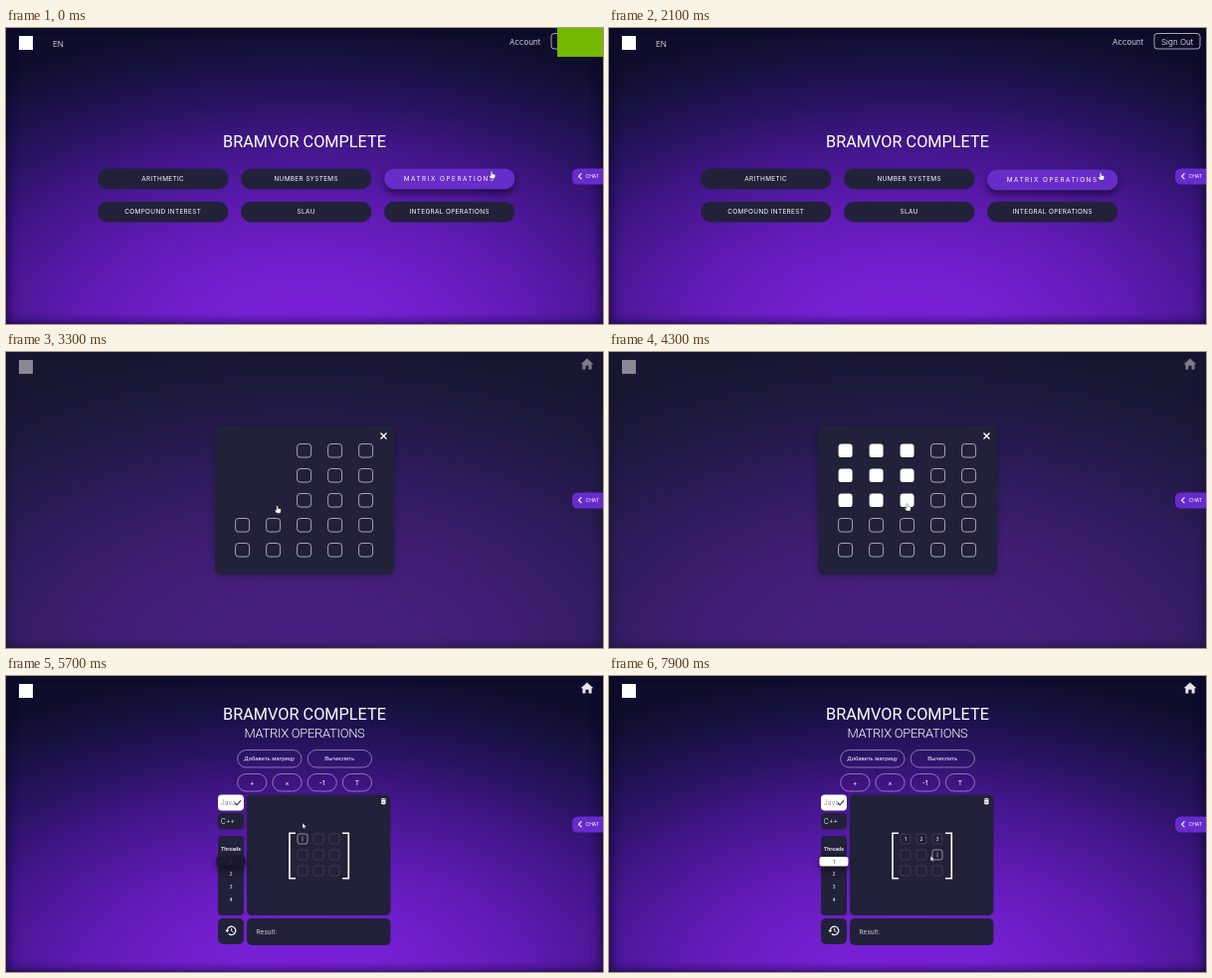
An HTML page for the animation above (8 s loop, 600x298 px).

```html
<!DOCTYPE html>
<html lang="en">
<head>
<meta charset="utf-8">
<title>Matrix calculator</title>
<style>
  html, body { margin: 0; width: 100%; height: 100%; overflow: hidden; background: #0d0c28; }
  #stage {
    position: absolute; left: 0; top: 0; width: 600px; height: 298px; overflow: hidden;
    background: radial-gradient(ellipse 560px 318px at 50% 104%,
      #7a20da 0%, #7520d2 18%, #641bb9 38%, #43168b 60%, #291362 75%, #171140 89%, #0e0d2b 100%);
    box-shadow: inset 0 0 12px rgba(10, 8, 40, .55);
  }
  #stage::after {
    content: ""; position: absolute; inset: 0; pointer-events: none;
    box-shadow: inset 0 0 11px rgba(10, 8, 40, .55); z-index: 0;
  }
  svg { position: absolute; left: 0; top: 0; display: block; z-index: 1; }
  text { fill: #fff; font-family: Inter, sans-serif; }
  .head { font-family: Roboto, sans-serif; font-size: 16.3px; text-anchor: middle; }
  .sub { font-family: Roboto, sans-serif; font-size: 13px; font-weight: 300; letter-spacing: -.3px; text-anchor: middle; }
  .nav { font-size: 8.1px; font-weight: 300; }
  .menu { font-size: 6.4px; text-anchor: middle; }
  .pill { font-family: "Liberation Sans", Arial, sans-serif; font-size: 5.9px; text-anchor: middle; }
  .op { font-size: 6.8px; text-anchor: middle; }
  .lang { font-size: 7px; font-weight: 300; }
  .num { font-size: 5px; text-anchor: middle; }
</style>
</head>
<body>
<div id="stage">
<svg id="svg" width="600" height="298" viewBox="0 0 600 298">
  <defs>
    <filter id="soft" x="-30%" y="-100%" width="160%" height="300%"><feGaussianBlur stdDeviation="3.5"/></filter>
  </defs>
  <rect x="13" y="8" width="14" height="14" fill="#fff"/>

  <g id="menu">
    <text class="nav" x="47" y="18.5">EN</text>
    <text class="nav" x="506" y="16.8">Account</text>
    <rect x="548" y="5.5" width="46" height="15.5" rx="3" fill="none" stroke="#fff" stroke-opacity=".8" stroke-width=".8"/>
    <text class="nav" x="555" y="16.6">Sign Out</text>
    <text class="head" x="300" y="119.8">BRAMVOR COMPLETE</text>
  </g>

  <path id="home" fill="#e6e4ee" d="M584 6.4 L590.4 12.2 H588.6 V17.6 H585.6 V13.8 H582.4 V17.6 H579.4 V12.2 H577.6 Z"/>

  <g id="work">
    <text class="head" x="300" y="44.3">BRAMVOR COMPLETE</text>
    <text class="sub" x="300" y="62">MATRIX OPERATIONS</text>
    <rect x="213" y="119.5" width="26" height="16" rx="4" fill="#fff"/>
    <text class="lang" x="215.8" y="130" style="fill:#77768a">Java</text>
    <path d="M230 127.8 l2 2 l4 -4.4" fill="none" stroke="#22213a" stroke-width="1.1"/>
    <g fill="#22213a">
      <rect x="213" y="138" width="26" height="16.5" rx="4"/>
      <rect x="213" y="161" width="26" height="80" rx="4"/>
      <rect x="213" y="244" width="26" height="26" rx="5"/>
      <rect x="242" y="119.5" width="144.5" height="121.5" rx="5"/>
      <rect x="242" y="244" width="144.5" height="27" rx="5"/>
    </g>
    <text class="lang" x="215.8" y="149">C++</text>
    <text class="num" x="226" y="175.8" style="font-weight:600">Threads</text>
    <rect x="211" y="184" width="30" height="11" rx="3" fill="#000" opacity=".5" filter="url(#soft)"/>
    <rect x="211.5" y="182" width="29" height="9.5" rx="2.5" fill="#1a1930"/>
    <rect id="thread" x="211.5" y="182" width="29" height="9.5" rx="2.5" fill="#fff"/>
    <text class="num" x="226" y="188.5" style="fill:#33324a">1</text>
    <g fill="none" stroke="#fff" stroke-width="1.2">
      <path d="M222.4 256.4 a4.2 4.2 0 1 1 1.4 3.1"/>
      <path d="M226.6 253.8 v2.8 l2 1.3" stroke-width=".9"/>
    </g>
    <path d="M220.2 255.8 h4.2 l-2.1 2.4 z" fill="#fff"/>
    <path d="M377 123.6 h1.3 l.5 -.5 h1.2 l.5 .5 h1.3 v.8 h-4.8 z M377.3 125 h4.2 v3.6 q0 .7 -.7 .7 h-2.8 q-.7 0 -.7 -.7 z" fill="#fff"/>
    <path d="M378.5 126.2 l1.8 1.8 m0 -1.8 l-1.8 1.8" stroke="#22213a" stroke-width=".5"/>
    <path d="M291 158.3 H285 V203.7 H291 M338 158.3 H344.3 V203.7 H338" fill="none" stroke="#fff" stroke-width="1.6"/>
    <text x="251.5" y="259.8" style="font-size:6.5px;fill:#cfced9">Result:</text>
  </g>

  <rect id="dim" width="600" height="298" fill="#212038" fill-opacity=".53"/>
  <g id="modal">
    <rect x="210" y="76" width="180" height="150" rx="6" opacity=".25" filter="url(#soft)"/>
    <rect x="210" y="74" width="180" height="150" rx="6" fill="#22213a"/>
    <path d="M376.5 81.5 l6 6 m0 -6 l-6 6" stroke="#fff" stroke-width="1.4"/>
  </g>

  <path d="M600 141.5 h-25 q-6 0 -6 6 v4 q0 6 6 6 h25 z" fill="#682bcb"/>
  <path d="M578.4 146.4 l-2.8 2.9 l2.8 2.9" fill="none" stroke="#fff" stroke-width="1.1"/>
  <text x="582.6" y="151" style="font-size:4.9px">CHAT</text>
  <rect id="block" x="554" y="0" width="46" height="29" fill="#74b800"/>

  <path id="arrow" d="M0 0 V5.4 L1.3 4.3 L2.2 6.1 L3 5.7 L2.2 4 H3.8 Z" fill="#fff" stroke="#111" stroke-width=".3"/>
  <path id="hand" d="M-.8 .6 Q0 -.5 .7 .6 V2.8 L3.2 3.4 Q3.9 3.6 3.8 4.4 L3.2 7.6 H-.6 L-2.5 4.9 Q-2.2 4 -1.4 4.5 L-.8 5 Z" fill="#fff" stroke="#111" stroke-width=".3"/>
</svg>
</div>
<script>
const LOOP = 8000;
const $ = id => document.getElementById(id);
const clamp = v => Math.max(0, Math.min(1, v));
const ramp = (t, a, b) => clamp((t - a) / (b - a));
const ease = p => p * p * (3 - 2 * p);
const show = (el, on) => { el.style.display = on ? '' : 'none'; };

function add(parent, tag, attrs, text) {
  const el = document.createElementNS('http://www.w3.org/2000/svg', tag);
  for (const k in attrs) el.setAttribute(k, attrs[k]);
  if (text) el.textContent = text;
  parent.appendChild(el);
  return el;
}
// last row of a table whose time has passed
const current = (table, t) => table.filter(r => r[0] <= t).pop();

// menu buttons with their hover spans
const labels = ['ARITHMETIC', 'NUMBER SYSTEMS', 'MATRIX OPERATIONS',
                'COMPOUND INTEREST', 'SLAU', 'INTEGRAL OPERATIONS'];
const hovers = { 1: [[1500, 1720]], 2: [[-900, 250], [1780, 2400]] };
const buttons = labels.map((label, i) => {
  const g = add($('menu'), 'g', {});
  const box = { x: 92 + 144 * (i % 3), y: 141.5 + 33.2 * (i / 3 | 0), width: 131.5, height: 20.8, rx: 10.4 };
  const shade = add(g, 'rect', { ...box, y: box.y + 4, filter: 'url(#soft)' });
  add(g, 'rect', { ...box, fill: '#22213a' });
  const glow = add(g, 'rect', { ...box, fill: '#672cca' });
  const text = add(g, 'text', { class: 'menu', x: box.x + 65.7, y: box.y + 12.7 }, label);
  return { g, shade, glow, text, spans: hovers[i] || [] };
});

// toolbar of the matrix page
const work = $('work');
function pill(x, y, w, label, cls) {
  add(work, 'rect', { x, y, width: w, height: 17.5, rx: 8.75, fill: 'none', stroke: '#fff', 'stroke-opacity': .6, 'stroke-width': .7 });
  add(work, 'text', { class: cls, x: x + w / 2, y: y + (cls === 'op' ? 11.2 : 10.8) }, label);
}
pill(232.7, 74.5, 64.3, 'Добавить матрицу', 'pill');
pill(303.2, 74.5, 64.3, 'Вычислить', 'pill');
['+', '×', '-1', 'T'].forEach((s, i) => pill(232.7 + 35.2 * i, 98.5, 29.2, s, 'op'));
[2, 3, 4].forEach(n => add(work, 'text', { class: 'num', x: 226, y: 175.7 + 12.8 * n }, n));

// 3 x 3 matrix inputs
const fields = Array.from({ length: 9 }, (_, i) => add(work, 'rect', {
  x: 293 + 16 * (i % 3), y: 159 + 16 * (i / 3 | 0), width: 10, height: 10, rx: 2, fill: 'none', stroke: '#fff', 'stroke-width': .6 }));
const typed = [[6500, 1], [6900, 2], [7400, 3]].map(([at, n]) =>
  ({ at, el: add(work, 'text', { class: 'num', x: 282 + 16 * n, y: 165.7 }, n) }));
const caret = add(work, 'rect', { width: .6, height: 5, fill: '#fff', opacity: .75 });
const focus = [[0, 0], [6700, 1], [7100, 2], [7600, 5]];

// size picker: time, columns, rows
const picks = [[0, 0, 0], [3150, 2, 3], [3700, 3, 4], [4000, 3, 3]];
const cells = Array.from({ length: 25 }, (_, i) => {
  const col = i % 5, row = i / 5 | 0;
  const box = { x: 230.6 + 31 * col, y: 92.5 + 25 * row, width: 14, height: 13.6, rx: 3.2 };
  return { col, row,
    line: add($('modal'), 'rect', { ...box, fill: 'none', stroke: '#c9c8d6', 'stroke-width': .8 }),
    fill: add($('modal'), 'rect', { ...box, fill: '#fff' }) };
});
function pickedAt(c, t) {
  let since = null;
  for (const [at, w, h] of picks) {
    if (at > t) break;
    since = c.col < w && c.row < h ? since ?? at : null;
  }
  return since;
}

// pointer: time, x, y, shape from then on
const path = [
  [0, 488, 144, 'hand'], [150, 488, 144, 'hand'], [350, 500, 118, 'arrow'], [800, 510.8, 88.6, 'arrow'],
  [950, 510.8, 88.6, 'arrow'], [1150, 524, 13, 'hand'], [1250, 524, 18, 'arrow'], [1500, 366, 148, 'hand'],
  [1620, 350, 150, 'hand'], [1720, 366, 149, 'arrow'], [1780, 400, 148, 'hand'], [2000, 494, 145.5, 'hand'],
  [2300, 494, 145.5, 'arrow'], [2700, 430, 150, 'arrow'], [3050, 290, 156, 'hand'], [3250, 272.6, 154.6, 'hand'],
  [3600, 272.6, 154.6, 'hand'], [3800, 299, 172, 'hand'], [3950, 299, 172, 'hand'], [4100, 299.6, 152.4, 'hand'],
  [5500, 299.6, 152.4, 'hand'], [5600, 298, 148, 'arrow'], [5900, 298, 148, 'arrow'], [6200, 298, 159, 'none'],
  [7800, 323.2, 181, 'none'], [7850, 323.2, 181, 'arrow'], [8000, 323.2, 181, 'arrow']
];
function movePointer(t) {
  const i = path.findIndex(p => p[0] > t) - 1;
  const a = path[i], b = path[i + 1], p = ease(ramp(t, a[0], b[0]));
  for (const shape of ['arrow', 'hand']) {
    show($(shape), a[3] === shape);
    $(shape).setAttribute('transform', `translate(${a[1] + (b[1] - a[1]) * p} ${a[2] + (b[2] - a[2]) * p})`);
  }
}

function render(t) {
  const inMenu = t < 2400;
  show($('block'), t < 100);
  show($('menu'), inMenu);
  show($('home'), !inMenu);
  show(work, t >= 5600);

  buttons.forEach(({ g, shade, glow, text, spans }, i) => {
    const h = Math.max(0, ...spans.map(([a, b]) => ramp(t, a, a + 200) * (1 - ramp(t, b, b + 200))));
    const press = i === 2 && t >= 2050 && t < 2400 ? 1 : 0;
    g.setAttribute('transform', `translate(0 ${press})`);
    shade.setAttribute('opacity', .5 * h);
    glow.setAttribute('opacity', h);
    text.style.letterSpacing = .35 + 1.15 * h + 'px';
  });

  const open = ease(ramp(t, 2800, 3100));
  $('dim').setAttribute('opacity', open * (1 - ramp(t, 5560, 5680)));
  $('modal').setAttribute('opacity', t < 5600 ? open : 0);
  for (const c of cells) {
    const since = pickedAt(c, t);
    show(c.line, since === null);
    c.fill.setAttribute('opacity', since === null ? 0 : ramp(t, since + 160, since + 300));
  }

  $('thread').setAttribute('opacity', ease(ramp(t, 5750, 6600)));
  const [at, cur] = current(focus, t);
  fields.forEach((f, i) => f.setAttribute('stroke-opacity', i === cur ? .85 : .2));
  typed.forEach(n => show(n.el, t >= n.at));
  const filled = typed[cur] && t >= typed[cur].at;
  const start = Math.max(at, 5600);
  caret.setAttribute('x', 297.7 + 16 * (cur % 3) + (filled ? 2.2 : 0));
  caret.setAttribute('y', 161.5 + 16 * (cur / 3 | 0));
  show(caret, (t - start) % 1000 < 500);

  movePointer(t);
}

const begin = performance.now();
function tick() {
  render((performance.now() - begin) % LOOP);
  requestAnimationFrame(tick);
}
tick();
</script>
</body>
</html>
```
